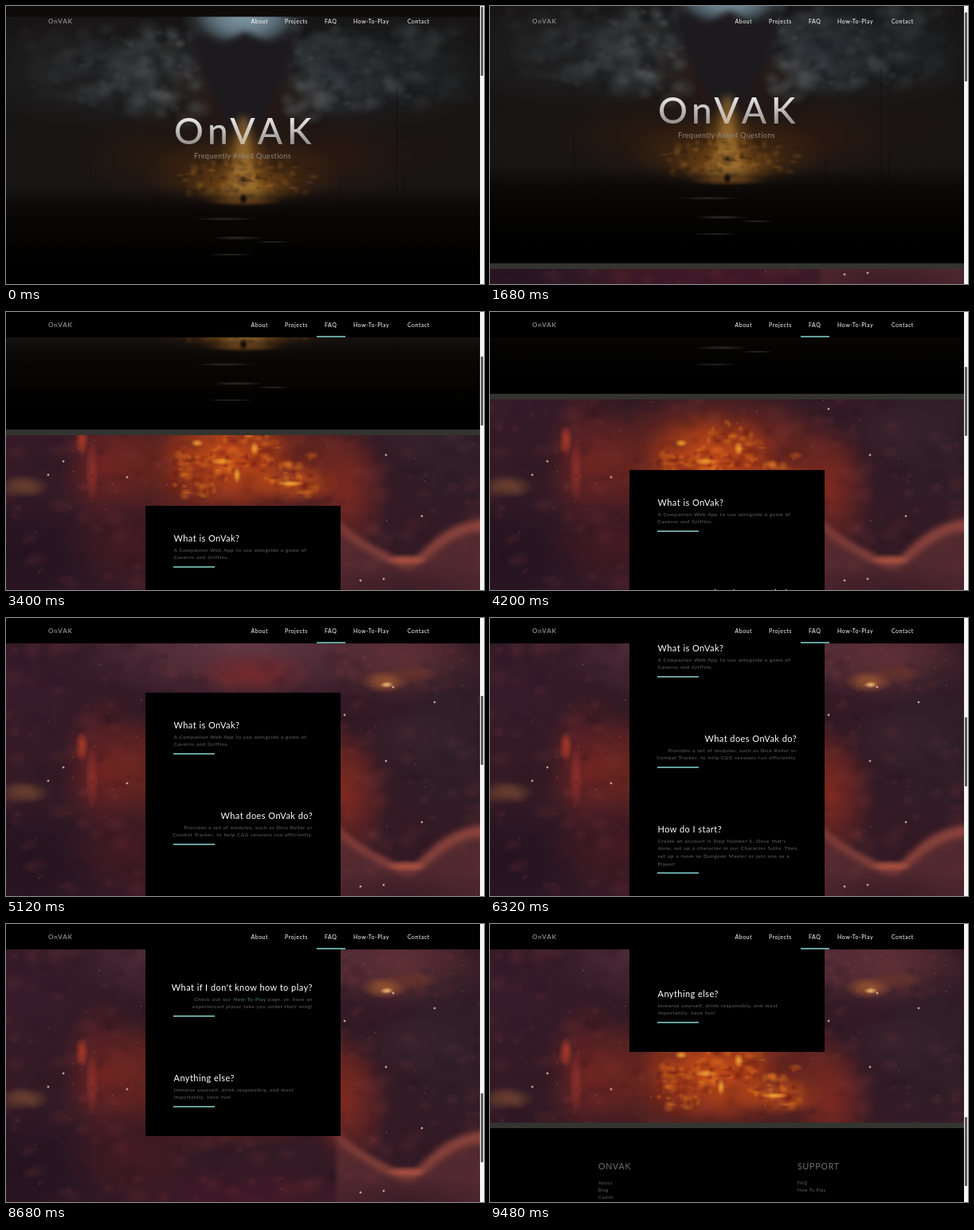
An HTML page with a canvas for the animation above (10000 ms loop, 600 by 350 pixels).

```html
<!DOCTYPE html>
<html lang="en">
<head>
<meta charset="utf-8">
<title>FAQ page scroll</title>
<style>
html, body { margin: 0; width: 100%; height: 100%; overflow: hidden; background: #000; }
#stage { position: relative; width: 600px; height: 350px; overflow: hidden; font-family: Lato, "Open Sans", sans-serif; }
#stage * { position: absolute; }
#page { left: 0; top: 0; width: 595px; height: 1265px; will-change: transform; }
canvas { left: 0; top: 0; }
.t { white-space: pre; line-height: 12px; margin-top: -6px; }
#stage .t span { position: static; color: #528480; }
.title { left: 0; width: 597px; text-align: center; font-size: 46px; font-weight: 500; line-height: 60px; margin-top: -30px;
  letter-spacing: 5.6px; text-indent: 3px; color: transparent;
  background: linear-gradient(rgba(255,255,255,.92) 20%, rgba(255,255,255,.5) 80%); -webkit-background-clip: text; background-clip: text; }
.sub { font-size: 9px; letter-spacing: .44px; color: #8d8782; }
.brand { font-size: 8px; font-weight: 700; letter-spacing: .9px; color: #858585; }
.link { font-size: 7px; letter-spacing: .5px; color: #fff; }
.head { font-size: 11px; letter-spacing: .45px; color: #fff; }
.body { font-size: 6.4px; letter-spacing: .47px; word-spacing: .4px; color: #686868; }
.foot { font-size: 10.5px; letter-spacing: .85px; color: #73716c; }
.small { font-size: 5.5px; letter-spacing: .55px; color: #626a69; }
#shade { left: 0; top: 0; width: 595px; height: 31.5px; background: #000; }
#links { left: 0; top: 0; }
#track { left: 595px; top: 0; width: 5px; height: 350px; background: #f6f6f6; }
#thumb { left: 1px; top: 0; width: 3px; height: 87px; border-radius: 1px; background: #5c5c5c; }
</style>
</head>
<body>
<div id="stage">
  <canvas id="nebula" width="595" height="350"></canvas>
  <div id="page"><canvas id="hero" width="595" height="350"></canvas></div>
  <div id="shade"></div>
  <div id="links"></div>
  <div id="track"><div id="thumb"></div></div>
</div>
<script>
const $ = id => document.getElementById(id);
const page = $('page'), links = $('links');

let seed = 7;
const rand = () => (seed = seed * 16807 % 2147483647) / 2147483647;

// ---- pictures ----
function blob(c, x, y, rx, ry, color, alpha = 1) {
  c.save();
  c.translate(x, y);
  c.scale(rx, ry);
  c.globalAlpha = alpha;
  const g = c.createRadialGradient(0, 0, 0, 0, 0, 1);
  g.addColorStop(0, color);
  g.addColorStop(.45, color + 'a0');
  g.addColorStop(1, color + '00');
  c.fillStyle = g;
  c.fillRect(-1, -1, 2, 2);
  c.restore();
}

function fade(c, y0, y1, stops) {
  const g = c.createLinearGradient(0, y0, 0, y1);
  stops.forEach(([at, color]) => g.addColorStop(at, color));
  c.fillStyle = g;
  c.fillRect(0, y0, 595, y1 - y0);
}

function softPath(c, blur, color, path) {
  c.save();
  c.filter = `blur(${blur}px)`;
  c.fillStyle = color;
  c.fill(new Path2D(path));
  c.restore();
}

function paintHero() {
  const c = $('hero').getContext('2d');
  const layer = list => list.forEach(b => blob(c, ...b));
  c.fillStyle = '#161414';
  c.fillRect(0, 0, 595, 350);
  layer([
    [110, 85, 160, 80, '#242425'], [470, 85, 150, 80, '#24282a'],
    [190, 88, 95, 62, '#393b3c'], [410, 85, 85, 62, '#31383c'],
    [60, 190, 150, 70, '#191514'], [530, 180, 150, 80, '#1a1514'],
    [200, 190, 120, 60, '#28190f'], [400, 190, 120, 60, '#2a1810'],
    [298, 120, 110, 70, '#2a1b17']
  ]);
  for (let i = 0; i < 420; i++) {
    const side = rand() < .5 ? -1 : 1, d = 55 + rand() * 220;
    const y = 28 + rand() * (130 - d * .15), r = 4 + rand() * 12;
    blob(c, 298 + side * d, y, r * 1.3, r, rand() < .5 ? '#62686a' : '#08080a', .34 * (1 - d / 320));
  }
  layer([[300, 14, 82, 46, '#5f7785'], [300, 14, 62, 34, '#7b929f']]);
  softPath(c, 4, '#1d1a1e', 'M232 28 L270 50 L300 32 L332 50 L368 28 L352 85 L318 150 H280 L246 85 Z');
  layer([
    [298, 212, 125, 52, '#4d2c10'], [298, 225, 80, 32, '#6e4314'],
    [298, 200, 34, 55, '#7c5019', .8], [298, 236, 58, 15, '#8a5a1f', .8]
  ]);
  softPath(c, 5, '#b5853f90', 'M292 140 H304 L309 200 L326 244 H270 L287 200 Z');
  for (let i = 0; i < 150; i++) {
    const a = rand() * 6.28, d = rand();
    blob(c, 298 + Math.cos(a) * 95 * d, 218 + Math.sin(a) * 30 * d, 3 + rand() * 6, 2 + rand() * 5, rand() < .45 ? '#a86d27' : '#180d07', .24);
  }
  fade(c, 228, 350, [[0, '#0a070600'], [.2, '#0a0706d0'], [.35, '#080605'], [.8, '#000000'], [1, '#000000']]);
  blob(c, 298, 246, 50, 6, '#8c5520', .55);
  blob(c, 298, 243, 6, 8, '#0b0705');
  [[290, 292, 34, 2.6], [335, 297, 22, 1.6], [282, 313, 30, 1.6], [275, 268, 40, 2]]
    .forEach(p => blob(c, ...p, '#4a3f3f', .6));
  c.fillStyle = '#06050540';
  [[490, 105, 150], [420, 215, 40], [105, 190, 60], [500, 215, 35]]
    .forEach(([x, y, h]) => c.fillRect(x, y, 1.5, h));
  c.fillStyle = '#0e0a09';
  c.fillRect(0, 0, 595, 13.5);
}

function paintNebula() {
  const c = $('nebula').getContext('2d');
  c.fillStyle = '#331a25';
  c.fillRect(0, 0, 595, 350);
  [
    [300, 30, 240, 85, '#633845'], [500, 50, 110, 60, '#5f3036'],
    [30, 90, 110, 100, '#371b2a'], [560, 160, 90, 120, '#30202a'],
    [125, 190, 60, 95, '#6a2323'], [20, 310, 130, 90, '#241320'],
    [160, 290, 90, 60, '#431a22'], [428, 225, 55, 85, '#782822'],
    [285, 190, 180, 95, '#962f17'], [278, 185, 85, 65, '#c04a18'],
    [310, 70, 80, 30, '#742a2c'], [360, 215, 60, 26, '#bb4c1a'],
    [300, 350, 190, 50, '#421827'], [95, 162, 9, 20, '#b43c28'],
    [108, 200, 9, 42, '#8a2e29'], [22, 220, 34, 15, '#69432e'],
    [475, 80, 32, 14, '#9a5530'], [478, 84, 9, 4, '#ffd07a'],
    [510, 70, 34, 12, '#70382f'], [510, 150, 60, 40, '#38222c']
  ].forEach(b => blob(c, ...b));

  // fine mottling
  for (let i = 0; i < 500; i++) {
    const r = 4 + rand() * 14;
    blob(c, rand() * 595, rand() * 350, r, r * .8, rand() < .4 ? '#93423f' : '#1c0c18', .14);
  }
  for (let i = 0; i < 190; i++) {
    const u = rand(), x = 205 + u * 185, y = 188 + Math.sin(u * 9) * 22 + (rand() - .5) * 60;
    blob(c, x, y, 3 + rand() * 7, 2 + rand() * 6, rand() < .5 ? '#f28320' : '#6d1c10', .38);
  }
  [[270, 188, 13, 5], [312, 172, 6, 9], [357, 216, 18, 4], [290, 205, 5, 11], [240, 165, 8, 5]]
    .forEach(b => blob(c, ...b, '#ffb637', .8));

  // cloud bank at lower right
  const bank = 'M415 262 C440 285 465 298 505 317 C530 300 545 266 605 260';
  softPath(c, 3, '#6a353890', bank + ' V360 H415 Z');
  softPath(c, 4, '#b05545a0', bank + ' V275 C555 275 535 312 505 326 C465 308 440 294 415 270 Z');
  blob(c, 503, 312, 26, 8, '#d5654a', .7);
  blob(c, 500, 350, 130, 36, '#3c1d28');

  for (let i = 0; i < 110; i++) {
    c.fillStyle = `rgba(255,185,165,${rand() * .6})`;
    c.fillRect(rand() * 595, rand() * 350, 1, 1);
  }
  [[152, 208], [72, 188], [477, 180], [486, 87], [522, 257], [425, 122], [53, 205], [445, 338], [474, 336], [538, 106]]
    .forEach(([x, y]) => blob(c, x, y, 1.9, 1.9, '#ffd8c4'));
}

// ---- page content ----
function text(parent, cls, x, y, str, right) {
  const d = document.createElement('div');
  d.className = 't ' + cls;
  d.innerHTML = str;
  if (x !== null) d.style[right ? 'right' : 'left'] = x + 'px';
  d.style.top = y + 'px';
  parent.append(d);
}

function box(parent, x, y, w, h, color) {
  const d = document.createElement('div');
  d.style.cssText = `left:${x}px;top:${y}px;width:${w}px;height:${h}px;background:${color}`;
  parent.append(d);
  return d;
}

function faq(y, title, lines, right) {
  const x = right ? 210 : 210.5;
  text(page, 'head', x, y, title, right);
  lines.forEach((line, i) => text(page, 'body', x, y + 14.7 + i * 9.6, line, right));
  box(page, 210, Math.round(y + 16 + lines.length * 9.6), 52, 2, '#64a19d');
}

paintHero();
paintNebula();
text(page, 'title', null, 156.5, 'OnVAK');
text(page, 'sub', 236, 189, 'Frequently Asked Questions');
box(page, 0, 350, 595, 7, '#33342f');
box(page, 175, 445.5, 245, 589.5, '#000');
box(page, 0, 1124, 595, 7, '#33342f');
box(page, 0, 1131, 595, 140, '#000');

faq(487, 'What is OnVak?', ['A Companion Web App to use alongside a game of', 'Caverns and Griffins.']);
faq(601, 'What does OnVak do?', ['Provides a set of modules, such as Dice Roller or', 'Combat Tracker, to help C&amp;G sessions run efficiently.'], true);
faq(715, 'How do I start?', ["Create an account is Step Number 1. Once that's", 'done, set up a character in our Character Suite. Then,',
  'set up a room as Dungeon Master or join one as a', 'Player!']);
faq(848, "What if I don't know how to play?", ['Check out our <span>How-To-Play</span> page, or, have an', 'experienced player take you under their wing!'], true);
faq(962, 'Anything else?', ['Immerse yourself, drink responsibly, and most', 'importantly, have fun!']);

text(page, 'foot', 136, 1179, 'ONVAK');
text(page, 'foot', 386, 1179, 'SUPPORT');
['About', 'Blog', 'Codrel'].forEach((s, i) => text(page, 'small', 136, 1200 + i * 8.8, s));
['FAQ', 'How To Play'].forEach((s, i) => text(page, 'small', 386, 1200 + i * 8.8, s));

text(links, 'brand', 53, 16, 'OnVAK');
[['About', 307.5], ['Projects', 350], ['FAQ', 400], ['How-To-Play', 436], ['Contact', 504]]
  .forEach(([s, x]) => text(links, 'link', x, 16, s));
const active = box(links, 389.5, 30, 36.5, 2, '#64a19d');

// ---- motion: each scroll is [start, end, from, to] ----
const LOOP = 10000, SHRINK = 1720;
const scrolls = [
  [880, 1280, 0, 24], [1640, 3680, 24, 220], [3960, 4920, 220, 350.5], [5080, 5480, 350.5, 378],
  [5880, 6120, 378, 399], [6240, 6320, 399, 449], [6480, 7000, 449, 570], [7280, 7880, 570, 684.3],
  [8240, 8720, 684.3, 773], [8960, 9480, 773, 874]
];
const ease = u => (u + u * u * (3 - 2 * u)) / 2;

function scrollAt(t) {
  let y = 0;
  for (const [a, b, from, to] of scrolls)
    if (t > a) y = from + (to - from) * ease(Math.min(1, (t - a) / (b - a)));
  return y;
}

function draw(now) {
  const t = Math.floor(now % LOOP / 40) * 40;
  const y = scrollAt(t), small = t >= SHRINK;
  page.style.transform = `translateY(${-Math.round(y)}px)`;
  $('thumb').style.top = y * .277 + .5 + 'px';
  $('shade').style.opacity = small ? Math.min(1, (t - SHRINK + 40) / 300) : 0;
  links.style.top = small ? 0 : '3.3px';
  active.style.display = small ? 'block' : 'none';
}

const start = performance.now();
function tick() {
  draw(performance.now() - start);
  requestAnimationFrame(tick);
}
tick();
</script>
</body>
</html>
```
